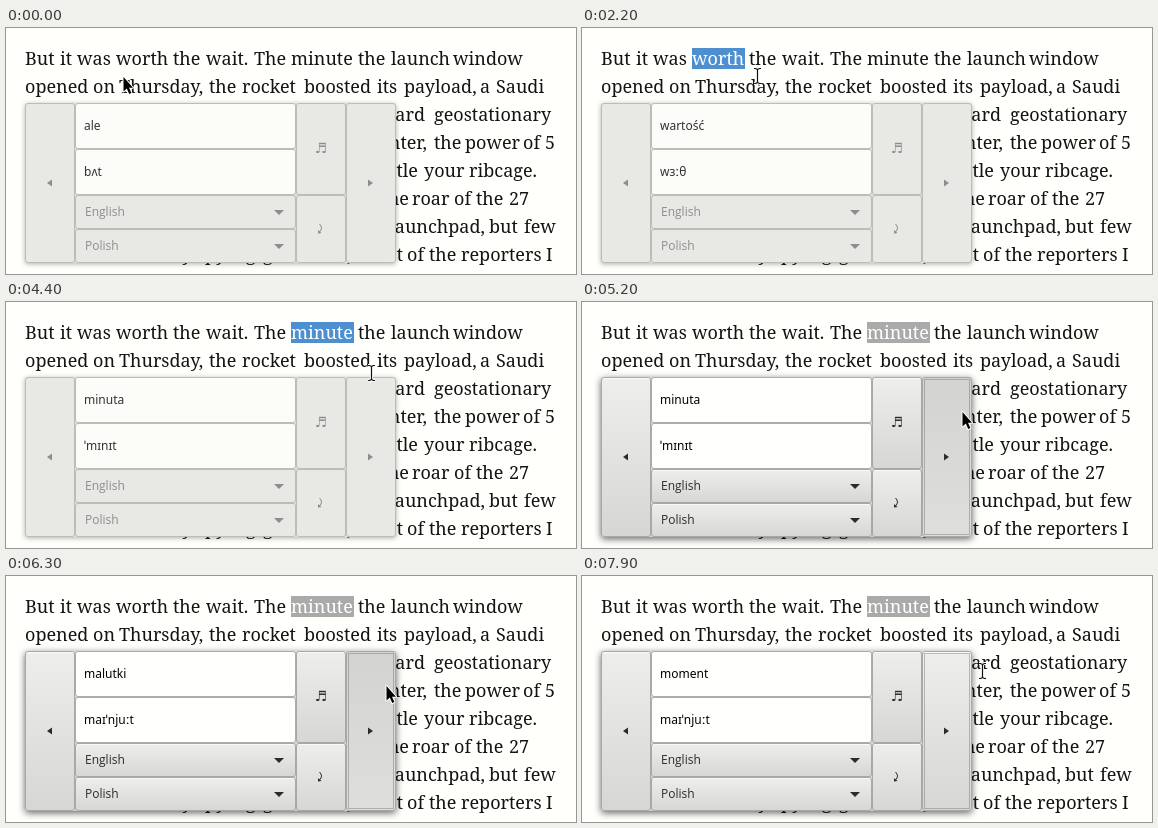
An HTML page with a canvas that plays this animation: 570 by 246 pixels, repeating every 8 s.

```html
<!DOCTYPE html>
<html lang="en">
<head>
<meta charset="utf-8">
<style>
html, body { margin: 0; width: 100%; height: 100%; overflow: hidden; background: #fffffb; }
canvas { display: block; }
</style>
</head>
<body>
<canvas id="stage" width="570" height="246"></canvas>
<script>
const ctx = document.getElementById('stage').getContext('2d');
const LOOP = 8000, STEP = 100;
const SERIF = '18px "Noto Serif", serif';
const ENTRY = '12px "Noto Sans", "DejaVu Sans", sans-serif';
const LABEL = '12px "Open Sans", "Noto Sans", sans-serif';

// Each line: baseline, then x and word pairs.
const article = [
  [37, 19, 'But', 54, 'it', 71, 'was', 110, 'worth', 167, 'the', 200, 'wait.', 248, 'The',
    285, 'minute', 352, 'the', 385, 'launch', 447, 'window'],
  [65, 19, 'opened', 87, 'on', 113, 'Thursday,', 203, 'the', 236, 'rocket', 298, 'boosted',
    371, 'its', 398, 'payload,', 474, 'a', 490, 'Saudi'],
  [93, 428, 'geostationary'],
  [121, 428, 'the', 459, 'power', 517, 'of', 539, '5'],
  [149, 418, 'your', 463, 'ribcage.'],
  [177, 406, 'roar', 448, 'of', 470, 'the', 503, '27'],
  [205, 483, 'but', 518, 'few'],
  [233, 176, 'y', 199, 'py', 240, 'g', 257, 'g', 341, ',', 401, 'of', 423, 'the', 455, 'reporters', 540, 'I']
];

// Words that run out from under the panel: right edge, baseline, word.
const covered = [
  [419, 93, 'toward'], [421, 121, 'Center,'], [412, 149, 'rattle'],
  [403, 177, 'the'], [479, 205, 'launchpad,'], [397, 233, 'most']
];

const entries = [
  [0, 'ale', 'bʌt'], [1900, 'wartość', 'wɜːθ'], [4400, 'minuta', 'ˈmɪnɪt'],
  [5800, 'malutki', 'maɪˈnjuːt'], [6400, 'minutka', 'ˈmɪnɪt'], [7000, 'moment', 'maɪˈnjuːt']
];

// Time, x, y, shape.
const pointer = [
  [0, 117, 49, 'arrow'], [100, 119, 50, 'beam'], [400, 133, 51, 'beam'], [1800, 133, 51, 'beam'],
  [1900, 142, 44, 'beam'], [2000, 147, 41, 'beam'], [2100, 147, 41, 'beam'], [2200, 176, 48, 'beam'],
  [2500, 243, 51, 'beam'], [2800, 317, 43, 'beam'], [3000, 339, 38, 'beam'], [3500, 339, 38, 'beam'],
  [3900, 362, 69, 'beam'], [4300, 362, 69, 'beam'], [4400, 366, 71, 'beam'], [4600, 366, 71, 'beam'],
  [4700, 372, 83, 'arrow'], [4900, 381, 105, 'arrow'], [5000, 381, 105, 'arrow'],
  [5100, 380, 110, 'arrow'], [7600, 380, 110, 'arrow'], [7700, 386, 106, 'arrow'],
  [7800, 397, 99, 'beam'], [7900, 401, 95, 'beam']
];

const presses = [[5100, 5400], [5800, 5900], [6300, 6400], [6900, 7000]];

const within = (t, a, b) => t >= a && t < b;
const latest = (list, t) => list.filter(item => item[0] <= t).pop();
const blend = (a, b, k) => `rgb(${a.map((v, i) => Math.round(v + (b[i] - v) * k))})`;
const grey = (a, b, k) => blend([a, a, a - 3], [b, b, b - 2], k);

function text(value, x, y, font, color, align = 'left') {
  ctx.font = font;
  ctx.fillStyle = color;
  ctx.textAlign = align;
  ctx.fillText(value, x, y);
}

function polygon(points, color) {
  ctx.beginPath();
  points.forEach(([x, y]) => ctx.lineTo(x, y));
  ctx.closePath();
  ctx.fillStyle = color;
  ctx.fill();
}

function drawArticle(t, focus) {
  const chosen = within(t, 1000, 2900) ? 'worth' : t >= 3200 ? 'minute' : '';
  if (chosen) {
    ctx.fillStyle = blend([78, 143, 208], [170, 170, 170], focus);
    if (chosen === 'worth') ctx.fillRect(110, 20, 53, 21);
    else ctx.fillRect(285, 20, 63, 21);
  }
  for (const [y, ...words] of article) {
    for (let i = 0; i < words.length; i += 2) {
      text(words[i + 1], words[i], y, SERIF, words[i + 1] === chosen ? '#fff' : '#141414');
    }
  }
  covered.forEach(([x, y, word]) => text(word, x, y, SERIF, '#141414', 'right'));
}

function cell(x, y, w, h, fill, border) {
  ctx.beginPath();
  ctx.roundRect(x + 0.5, y + 0.5, w - 1, h - 1, 2.5);
  ctx.fillStyle = fill;
  ctx.fill();
  ctx.strokeStyle = border;
  ctx.lineWidth = 1;
  ctx.stroke();
}

function button(x, y, w, h, focus, pressed) {
  const shade = ctx.createLinearGradient(0, y, 0, y + h);
  shade.addColorStop(0, grey(232, pressed ? 211 : 238, focus));
  shade.addColorStop(1, grey(232, pressed ? 222 : 214, focus));
  cell(x, y, w, h, shade, grey(188, 168, focus));
  if (!pressed && focus) {
    ctx.fillStyle = `rgba(255,255,255,${0.7 * focus})`;
    ctx.fillRect(x + 2, y + 1, w - 4, 1);
  }
}

function drawIcons(ink) {
  polygon([[46, 151.5], [46, 158.5], [41, 155]], ink);
  polygon([[362, 151.5], [362, 158.5], [367, 155]], ink);
  for (const y of [182, 216]) polygon([[268, y], [278, y], [273, y + 5]], ink);
  text('♬', 315, 125, '14px "DejaVu Sans", sans-serif', ink, 'center');
  ctx.beginPath();
  ctx.moveTo(313.5, 196);
  ctx.quadraticCurveTo(317.5, 200, 313.5, 204);
  ctx.strokeStyle = ink;
  ctx.lineWidth = 1;
  ctx.stroke();
  polygon([[312, 202], [312, 205.5], [315.5, 205]], ink);
}

function drawPanel(t, focus) {
  const pressed = presses.some(([a, b]) => within(t, a, b));
  const ink = blend([139, 142, 140], [40, 44, 45], focus);
  const entryInk = blend([46, 52, 54], [0, 0, 0], focus);
  const [, word, sound] = latest(entries, t);

  ctx.save();
  ctx.shadowColor = `rgba(0,0,0,${0.32 + 0.28 * focus})`;
  ctx.shadowBlur = 5 + 2 * focus;
  ctx.shadowOffsetY = 1 + focus;
  ctx.beginPath();
  ctx.roundRect(19, 75, 371, 160, 2);
  ctx.fillStyle = grey(222, 214, focus);
  ctx.fill();
  ctx.restore();

  button(19, 75, 50, 160, focus);
  button(69, 167, 221, 34, focus);
  button(69, 201, 221, 34, focus);
  button(290, 75, 50, 92, focus);
  button(290, 167, 50, 68, focus);
  button(340, 75, 50, 160, focus, pressed);
  for (const y of [75, 121]) {
    cell(69, y, 221, 46, blend([252, 252, 248], [255, 255, 253], focus), grey(188, 172, focus));
  }
  if (focus) {
    ctx.save();
    ctx.setLineDash([1, 1]);
    ctx.strokeStyle = `rgba(95,95,95,${0.75 * focus})`;
    ctx.strokeRect(342.5, 77.5, 45, 155);
    ctx.restore();
  }

  text(word, 78, 102, ENTRY, entryInk);
  text(sound, 78, 148, ENTRY, entryInk);
  text('English', 79, 188, LABEL, ink);
  text('Polish', 79, 222, LABEL, ink);
  drawIcons(ink);
}

function drawPointer(t) {
  const from = latest(pointer, t);
  const to = pointer.find(key => key[0] > t) || from;
  const k = to === from ? 0 : (t - from[0]) / (to[0] - from[0]);
  const at = i => Math.round(from[i] + (to[i] - from[i]) * k);
  const arrow = from[3] === 'arrow';
  const shape = new Path2D(arrow
    ? 'M.5 0V14.5L3.8 11.5L6.2 17L8.4 16L6 10.8H10Z'
    : 'M-4 -7.5H-2.5L-.5 -6.5L1.5 -7.5H3M-.5 -6.5V6.5M-4 7.5H-2.5L-.5 6.5L1.5 7.5H3');
  ctx.save();
  ctx.translate(at(1), at(2));
  ctx.lineJoin = 'round';
  ctx.strokeStyle = '#fff';
  ctx.lineWidth = arrow ? 2 : 3;
  ctx.stroke(shape);
  if (arrow) {
    ctx.fillStyle = '#000';
    ctx.fill(shape);
  } else {
    ctx.strokeStyle = '#111';
    ctx.lineWidth = 1.2;
    ctx.stroke(shape);
  }
  ctx.restore();
}

function frame(now) {
  const t = Math.floor((now % LOOP) / STEP) * STEP;
  const focus = t < 5100 ? 0 : t < 5200 ? 0.5 : 1;
  ctx.fillStyle = '#fffffb';
  ctx.fillRect(0, 0, 570, 246);
  drawArticle(t, focus);
  drawPanel(t, focus);
  drawPointer(t);
  requestAnimationFrame(frame);
}
requestAnimationFrame(frame);
</script>
</body>
</html>
```
